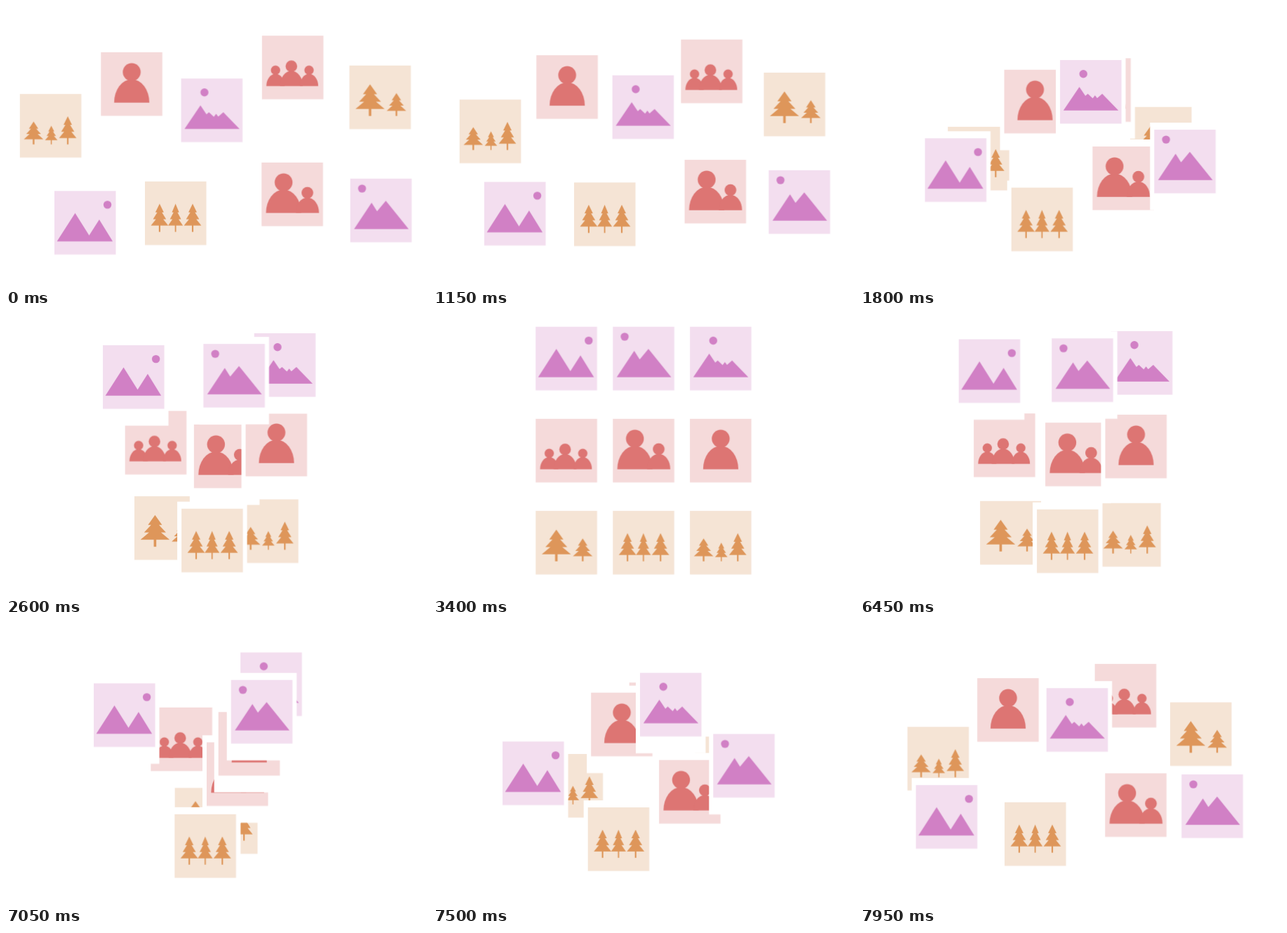
Recreate the animation shown at these times as an HTML page without scripts. Size 600x400 px, loop 8000 ms.

```html
<!DOCTYPE html>
<html lang="en">
<head>
<meta charset="utf-8">
<title>Sorting photos</title>
<style>
  html, body { margin: 0; width: 100%; height: 100%; overflow: hidden; background: #fff; }
  svg { display: block; width: 600px; height: 400px; }

  .peaks  { --paper: #f3deef; fill: #d180c5; }
  .people { --paper: #f5dada; fill: #dd7573; }
  .trees  { --paper: #f5e4d5; fill: #de965a; }
  .border { fill: #fff; }
  .paper  { fill: var(--paper); }

  /* --x and --y are the scattered offset from the card's grid cell */
  .card { animation: sort 8s linear infinite; }
  @keyframes sort {
    0% { transform: translate(var(--x), var(--y)); }
    5.5% {
      transform: translate(var(--x), var(--y));
      animation-timing-function: cubic-bezier(.7, 0, .375, 1);
    }
    43% { transform: translate(0px, 0px); }
    68.575% {
      transform: translate(0px, 0px);
      animation-timing-function: cubic-bezier(.775, 0, .663, .696);
    }
    /* cut while the cards are still drifting apart */
    100% { transform: translate(calc(var(--x) * .8782), calc(var(--y) * .8782)); }
  }
</style>
</head>
<body>
<svg viewBox="0 0 600 400">
  <defs>
    <g id="frame">
      <rect class="border" x="-6" y="-10" width="99.5" height="124.5"/>
      <rect class="paper" width="87.5" height="90.5"/>
    </g>
    <g id="person">
      <circle cy="-43.4" r="12.7"/>
      <path d="M-25.1 0a25.1 33.2 0 0 1 50.2 0z"/>
    </g>
    <path id="tree" d="M0-45 10-31H5.5L15.6-20.3H8.5L20.7-10H1.8V0H-1.8V-10H-20.7L-8.5-20.3H-15.6L-5.5-31H-10z"/>
    <use id="small-tree" href="#tree" transform="scale(.67 .72)"/>
    <use id="slim-tree" href="#tree" transform="scale(.6 .89)"/>
  </defs>

  <g transform="translate(366.2 278.8)">
    <g class="card trees" style="--x:-346.4px; --y:-153.6px">
      <use href="#frame"/>
      <use href="#small-tree" x="19.5" y="71.7"/>
      <use href="#tree" transform="translate(44.7 71.7) scale(.43 .59)"/>
      <use href="#slim-tree" x="68.2" y="71.7"/>
    </g>
  </g>

  <g transform="translate(146.3 278.8)">
    <g class="card trees" style="--x:343.1px; --y:-194.1px">
      <use href="#frame"/>
      <use href="#tree" x="29.4" y="71.7"/>
      <use href="#small-tree" x="67" y="71.7"/>
    </g>
  </g>

  <g transform="translate(146.3 147.8)">
    <g class="card people" style="--x:218.5px; --y:-105.6px">
      <use href="#frame"/>
      <use href="#person" transform="translate(19.3 71.7) scale(.52)"/>
      <use href="#person" transform="translate(41.9 71.7) scale(.65)"/>
      <use href="#person" transform="translate(67.1 71.7) scale(.52)"/>
    </g>
  </g>

  <g transform="translate(256.3 147.8)">
    <g class="card people" style="--x:107.9px; --y:75px">
      <use href="#frame"/>
      <use href="#person" x="31.4" y="71.7"/>
      <use href="#person" transform="translate(65.3 71.7) scale(.66)"/>
    </g>
  </g>

  <g transform="translate(256.3 278.8)">
    <g class="card trees" style="--x:-58.3px; --y:-29.1px">
      <use href="#frame"/>
      <use href="#slim-tree" x="20.9" y="71.7"/>
      <use href="#tree" transform="translate(43.6 71.7) scale(.51 .89)"/>
      <use href="#slim-tree" x="68" y="71.7"/>
    </g>
  </g>

  <g transform="translate(366.2 147.8)">
    <g class="card people" style="--x:-230.9px; --y:-82px">
      <use href="#frame"/>
      <use href="#person" x="43.9" y="71.7"/>
    </g>
  </g>

  <g transform="translate(366.2 16.7)">
    <g class="card peaks" style="--x:-116.6px; --y:86.5px">
      <use href="#frame"/>
      <circle cx="33.2" cy="19.8" r="5.7"/>
      <path d="M4.8 71.8 27.5 38.3 36.1 51 39.6 47.9 46.6 54.6 49.8 50.2 52.9 54.2 60.1 48 83.2 71.8z"/>
    </g>
  </g>

  <g transform="translate(256.3 16.7)">
    <g class="card peaks" style="--x:234.3px; --y:229px">
      <use href="#frame"/>
      <circle cx="16.8" cy="14.1" r="5.7"/>
      <path d="M5.5 71.8 30.4 34.3 38.2 46.4 50.7 31.6 83.2 71.8z"/>
    </g>
  </g>

  <g transform="translate(146.3 16.7)">
    <g class="card peaks" style="--x:-77.3px; --y:246.6px">
      <use href="#frame"/>
      <circle cx="75.6" cy="19.6" r="5.7"/>
      <path d="M3.6 71.8 29.5 31.6 49.5 63.2 63.9 40.8 83.1 71.8z"/>
    </g>
  </g>
</svg>
</body>
</html>
```
